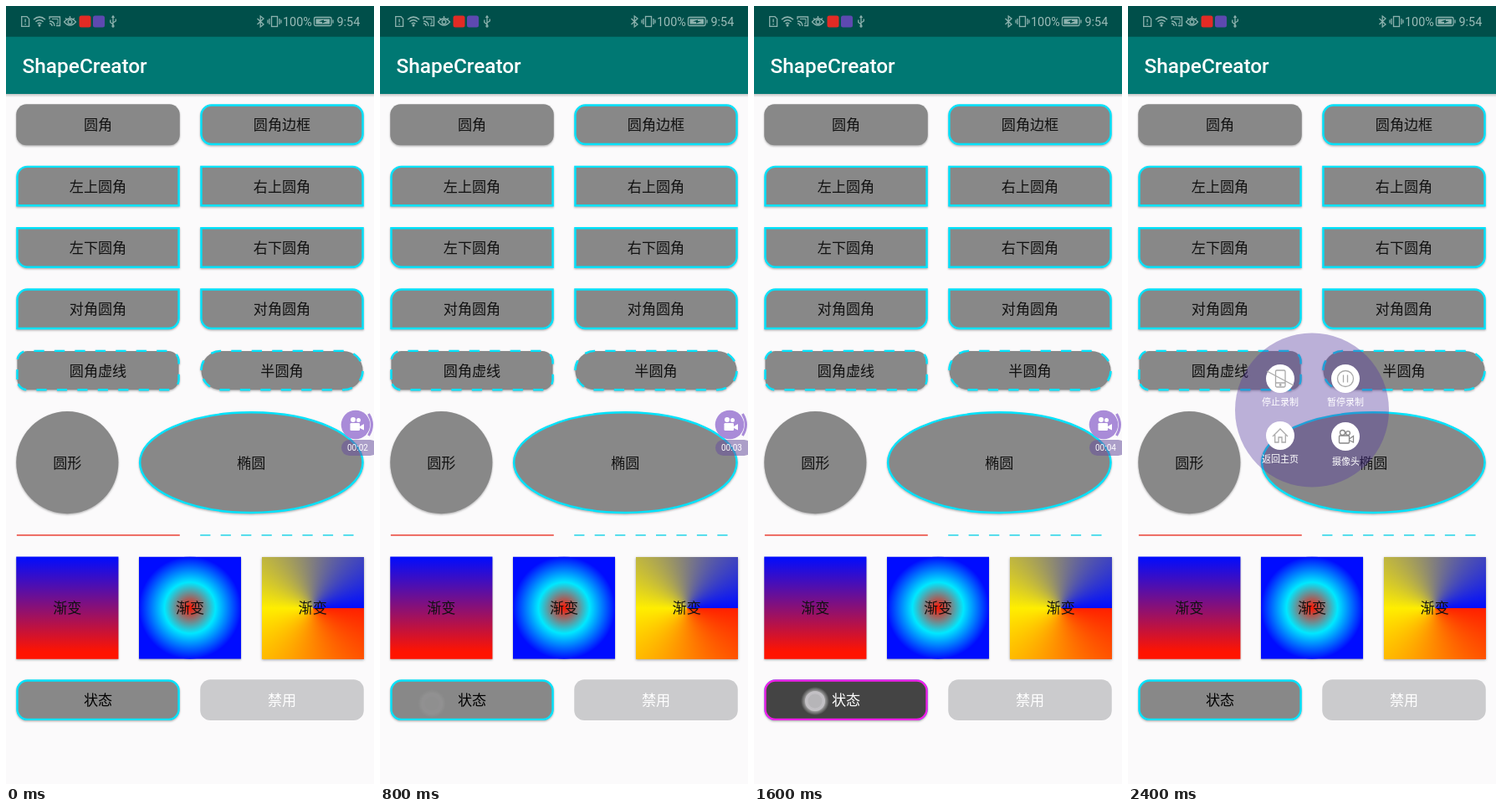
Write an HTML page that moves like this. It is 440 px wide and 929 px high and loops after 2.6 s.

```html
<!DOCTYPE html>
<html lang="zh-CN">
<head>
<meta charset="utf-8">
<title>ShapeCreator</title>
<style>
html, body { margin: 0; width: 100%; height: 100%; overflow: hidden; background: #fbfafb; }
#stage { position: relative; width: 440px; height: 929px; overflow: hidden; }
svg { position: absolute; left: 0; top: 0; }
#sweep {
  position: absolute; left: 305.6px; top: 657.6px; width: 122.2px; height: 122.2px;
  background: conic-gradient(from 90deg, #ff2000, #ffee00 50%, #000cff);
  box-shadow: 0 1px 3px rgba(0,0,0,.35);
}
text { font-family: "Noto Sans CJK SC", "Noto Sans CJK", sans-serif; text-anchor: middle; }
.latin { font-family: Roboto, sans-serif; text-anchor: start; }
.label { font-size: 14px; fill: #111; }
.raised { filter: drop-shadow(0 1px 1px rgba(0,0,0,.3)); }
.icon { fill: none; stroke: #8db2ae; stroke-width: 1.3; }
.glyph { fill: none; stroke: #aaa; stroke-width: 1.3; }

.anim { animation: 2.6s step-end infinite; }
#pressed { animation-name: pressed; }
#dot { animation-name: dot; }
#t2 { animation-name: t2; }
#t3 { animation-name: t3; }
#t4 { animation-name: t4; }
#tap { animation-name: tap; }
#cam { animation-name: cam; }
#float { animation-name: float; }
#menu { animation-name: menu; transform-origin: 220px 482.5px; }

@keyframes pressed { 0% { opacity: 0 } 34.6% { opacity: 1 } 69.2% { opacity: 0 } }
@keyframes dot {
  0% { opacity: 0; transform: translate(62px, 833px) }
  30.76% { opacity: .16; transform: translate(62px, 833px) }
  34.6% { opacity: 1; transform: translate(64px, 831px) }
  38.45% { opacity: 1; transform: translate(66px, 829px) }
  42.3% { opacity: 1; transform: translate(67px, 827px) }
  46.14% { opacity: 1; transform: translate(70px, 828.5px) }
  49.99% { opacity: 1; transform: translate(73px, 830px) }
  69.2% { opacity: .3; transform: translate(73px, 830px) }
  73.06%, 100% { opacity: 0; transform: translate(73px, 830px) }
}
@keyframes t2 { 0% { opacity: 1 } 26.9%, 100% { opacity: 0 } }
@keyframes t3 { 0% { opacity: 0 } 26.9% { opacity: 1 } 61.5%, 100% { opacity: 0 } }
@keyframes t4 { 0% { opacity: 0 } 61.5%, 100% { opacity: 1 } }
@keyframes tap { 0% { opacity: 0 } 80.75% { opacity: .5 } 84.6%, 100% { opacity: 1 } }
@keyframes cam { 0% { transform: none } 84.6%, 100% { transform: translate(1px, 0) } }
@keyframes float { 0% { opacity: 1 } 88.45%, 100% { opacity: 0 } }
@keyframes menu {
  0% { opacity: 0; transform: scale(.8) }
  88.45% { opacity: .6; transform: scale(.8) }
  92.3%, 100% { opacity: 1; transform: none }
}
</style>
</head>
<body>
<div id="stage">
<div id="sweep"></div>
<svg width="440" height="929" viewBox="0 0 440 929">
  <defs>
    <linearGradient id="fade" x2="0" y2="1">
      <stop stop-color="#000cff"/><stop offset=".93" stop-color="#ff1400"/>
    </linearGradient>
    <radialGradient id="rings">
      <stop stop-color="#ff1400"/><stop offset=".5" stop-color="#00e8ff"/><stop offset="1" stop-color="#000cff"/>
    </radialGradient>
    <linearGradient id="under" x2="0" y2="1">
      <stop stop-color="#000" stop-opacity=".22"/><stop offset="1" stop-color="#000" stop-opacity="0"/>
    </linearGradient>
    <radialGradient id="glow">
      <stop offset=".6" stop-color="#fff" stop-opacity=".65"/><stop offset="1" stop-color="#fff" stop-opacity="0"/>
    </radialGradient>
    <clipPath id="square"><rect x="130" y="538" width="100" height="100"/></clipPath>
  </defs>

  <rect y="105" width="440" height="4" fill="url(#under)"/>
  <rect y="36" width="440" height="69" fill="#007873"/>
  <rect width="440" height="36.7" fill="#004f4a"/>
  <text class="latin" x="19.6" y="80" font-size="24.4" font-weight="500" fill="#fff">ShapeCreator</text>

  <g class="icon">
    <path d="M18.7 12.7H25L27.6 15.4V24.3H18.7ZM23.1 15.5V19.6M23.1 21V22.4"/>
    <path d="M33 16.3Q40 10 47 16.3M35.4 18.8Q40 14.7 44.6 18.8M37.7 21.3Q40 19.3 42.3 21.3" stroke-width="1.5"/>
    <circle cx="40" cy="23.3" r=".8"/>
    <path d="M52 16V13H64.5V23.5H60M52 18Q57.8 18.2 58 24M52 20.8Q55 21 55.2 24"/>
    <path d="M55 15.5H62V21H60" stroke-width="1"/>
    <path d="M69.5 19Q76.5 11 83.5 19Q76.5 27 69.5 19ZM71 14.5L73 16M76.5 12V14.3M82 14.5L80 16"/>
    <circle cx="76.5" cy="19" r="2.4"/>
    <path d="M128 12V24M126.5 14L128 11.8L129.5 14M128 22L124.8 19.5V16.5M128 20L131.3 18V15.5"/>
    <circle cx="128" cy="24" r="1"/>
    <path d="M300.5 15L308 22L304.2 25V12L308 15L300.5 22"/>
    <rect x="317.5" y="12.5" width="7" height="12"/>
    <path d="M315 15V22M313 16.5V20.5M327 15V22M329 16.5V20.5"/>
    <rect x="368.5" y="13.5" width="20.5" height="10" rx="1.5"/>
    <path d="M391 16.5V20.5"/>
  </g>
  <rect x="370.5" y="15.5" width="16.5" height="6" fill="#8db2ae"/>
  <path d="M374 18.5L380 16.5V18H384L378 20.8V19Z" fill="#004f4a"/>
  <rect x="87.5" y="11.5" width="14" height="14" rx="2.5" fill="#e32b25"/>
  <rect x="104" y="11.5" width="14" height="14" rx="2.5" fill="#5d49b0"/>
  <g class="latin" fill="#9bbcb8" font-size="14.4">
    <text class="latin" x="331" y="24">100%</text>
    <text class="latin" x="395.5" y="24">9:54</text>
  </g>

  <g transform="scale(1.22222)">
    <g id="shapes"></g>
    <path d="M10.5 517H170" stroke="#ec5a50" stroke-width="1.4"/>
    <path d="M190 517H350" stroke="#3fd9ea" stroke-width="1.4" stroke-dasharray="10"/>
    <rect class="raised" x="10" y="538" width="100" height="100" fill="url(#fade)"/>
    <g class="raised"><g clip-path="url(#square)">
      <rect x="130" y="538" width="100" height="100" fill="#000cff"/>
      <circle cx="180" cy="588" r="50" fill="url(#rings)"/>
    </g></g>
    <g id="labels"></g>
    <g id="pressed" class="anim"></g>
  </g>

  <g id="dot" class="anim">
    <circle r="17" fill="url(#glow)"/>
    <circle r="12" fill="#c2c0c4"/>
    <circle r="8.5" fill="#b6b5b8"/>
  </g>

  <g id="float" class="anim">
    <circle cx="418" cy="500" r="17.3" fill="#a98bd8"/>
    <path d="M433.5 487Q441.5 500 433.5 513" fill="none" stroke="#a98bd8" stroke-width="3"/>
    <rect x="401" y="518" width="44" height="19" rx="9.5" fill="#6b529f" fill-opacity=".55"/>
    <g id="tap" class="anim">
      <circle cx="427" cy="500" r="14" fill="#fff" fill-opacity=".38"/>
    </g>
    <g id="cam" class="anim" fill="#fff">
      <circle cx="415" cy="494" r="3"/><circle cx="421.5" cy="494.5" r="2.5"/>
      <rect x="411.5" y="498" width="11.5" height="9" rx="1.2"/>
      <path d="M423 502L428 499V506.5L423 504Z"/>
    </g>
    <g fill="#fff" font-size="10">
      <text id="t2" class="latin anim" x="408" y="531">00:02</text>
      <text id="t3" class="latin anim" x="408" y="531">00:03</text>
      <text id="t4" class="latin anim" x="408" y="531">00:04</text>
    </g>
  </g>

  <g id="menu" class="anim">
    <circle cx="220" cy="482.5" r="92" fill="#5537a0" fill-opacity=".38"/>
    <g fill="#fff">
      <circle cx="182" cy="445" r="17"/><circle cx="260" cy="445" r="17"/>
      <circle cx="182" cy="513" r="17"/><circle cx="260" cy="514" r="17"/>
    </g>
    <g class="glyph">
      <rect x="176.5" y="435" width="11.5" height="20" rx="1.5"/>
      <path d="M176.5 450H188M166 436L198 453"/>
      <circle cx="182.2" cy="452.5" r=".8"/>
      <circle cx="260" cy="445" r="9.5"/>
      <path d="M257.5 440.5V449.5M262.5 440.5V449.5"/>
      <path d="M173 514L182 505L191 514M175.7 512V521H180V515H184V521H188.3V512"/>
      <g stroke="#888">
        <circle cx="256.5" cy="509.5" r="3"/><circle cx="263" cy="510" r="2.4"/>
        <rect x="252.5" y="513" width="12" height="9" rx="1"/>
        <path d="M264.5 517L269.5 513.5V521L264.5 518.5"/>
      </g>
    </g>
    <g fill="#fff" font-size="11">
      <text x="182" y="476.5">停止录制</text><text x="260" y="476.5">暂停录制</text>
      <text x="182" y="545">返回主页</text><text x="260.5" y="547.5">摄像头</text>
    </g>
  </g>
</svg>
</div>
<script>
const CYAN = '#00e2fb', GREY = '#888';
const byId = id => document.getElementById(id);

function add(parent, tag, attrs, content = '') {
  const el = document.createElementNS('http://www.w3.org/2000/svg', tag);
  for (const key in attrs) el.setAttribute(key, attrs[key]);
  el.textContent = content;
  byId(parent).append(el);
}

// Radii run clockwise from top left; the outline starts at the lower left.
function outline(x, y, w, h, [tl, tr, br, bl]) {
  const arc = (r, dx, dy) => r ? `a${r} ${r} 0 0 1 ${dx * r} ${dy * r}` : '';
  return `M${x} ${y + h - bl}V${y + tl}${arc(tl, 1, -1)}H${x + w - tr}${arc(tr, 1, 1)}` +
    `V${y + h - br}${arc(br, -1, 1)}H${x + bl}${arc(bl, -1, -1)}Z`;
}

function label(x, y, text, fill = '#111', parent = 'labels') {
  add(parent, 'text', { class: 'label', x, y: y + 5.4, style: `fill:${fill}` }, text);
}

function button(x, y, text, radii, { fill = GREY, stroke = CYAN, dash = 'none', ink, flat, parent = 'shapes' } = {}) {
  const inset = stroke === 'none' ? 0 : 1;
  add(parent, 'path', {
    d: outline(x + inset, y + inset, 160 - 2 * inset, 40 - 2 * inset, radii),
    fill, stroke, 'stroke-width': 2, 'stroke-dasharray': dash, class: flat ? '' : 'raised'
  });
  label(x + 80, y + 20, text, ink, parent === 'shapes' ? 'labels' : parent);
}

const all = r => [r, r, r, r];
const L = 10, R = 190;

button(L, 96, '圆角', all(10), { stroke: 'none' });
button(R, 96, '圆角边框', all(10));
button(L, 156, '左上圆角', [10, 0, 0, 0]);
button(R, 156, '右上圆角', [0, 10, 0, 0]);
button(L, 216, '左下圆角', [0, 0, 0, 10]);
button(R, 216, '右下圆角', [0, 0, 10, 0]);
button(L, 276, '对角圆角', [10, 0, 10, 0]);
button(R, 276, '对角圆角', [0, 10, 0, 10]);
button(L, 336, '圆角虚线', all(10), { dash: 10 });
button(R, 336, '半圆角', all(19), { dash: 10 });
button(L, 658, '状态', all(10), { ink: '#000' });
button(R, 658, '禁用', all(10), { fill: '#cbcbcd', stroke: 'none', ink: '#fff', flat: true });
button(L, 658, '状态', all(10), { fill: '#444', stroke: '#f01fe8', ink: '#fff', flat: true, parent: 'pressed' });

add('shapes', 'circle', { cx: 60, cy: 446, r: 50, fill: GREY, class: 'raised' });
add('shapes', 'ellipse', { cx: 240, cy: 446, rx: 109, ry: 49, fill: GREY, stroke: CYAN, 'stroke-width': 2, class: 'raised' });
label(60, 446, '圆形');
label(240, 446, '椭圆');
[60, 180, 300].forEach(x => label(x, 588, '渐变'));
</script>
</body>
</html>
```
